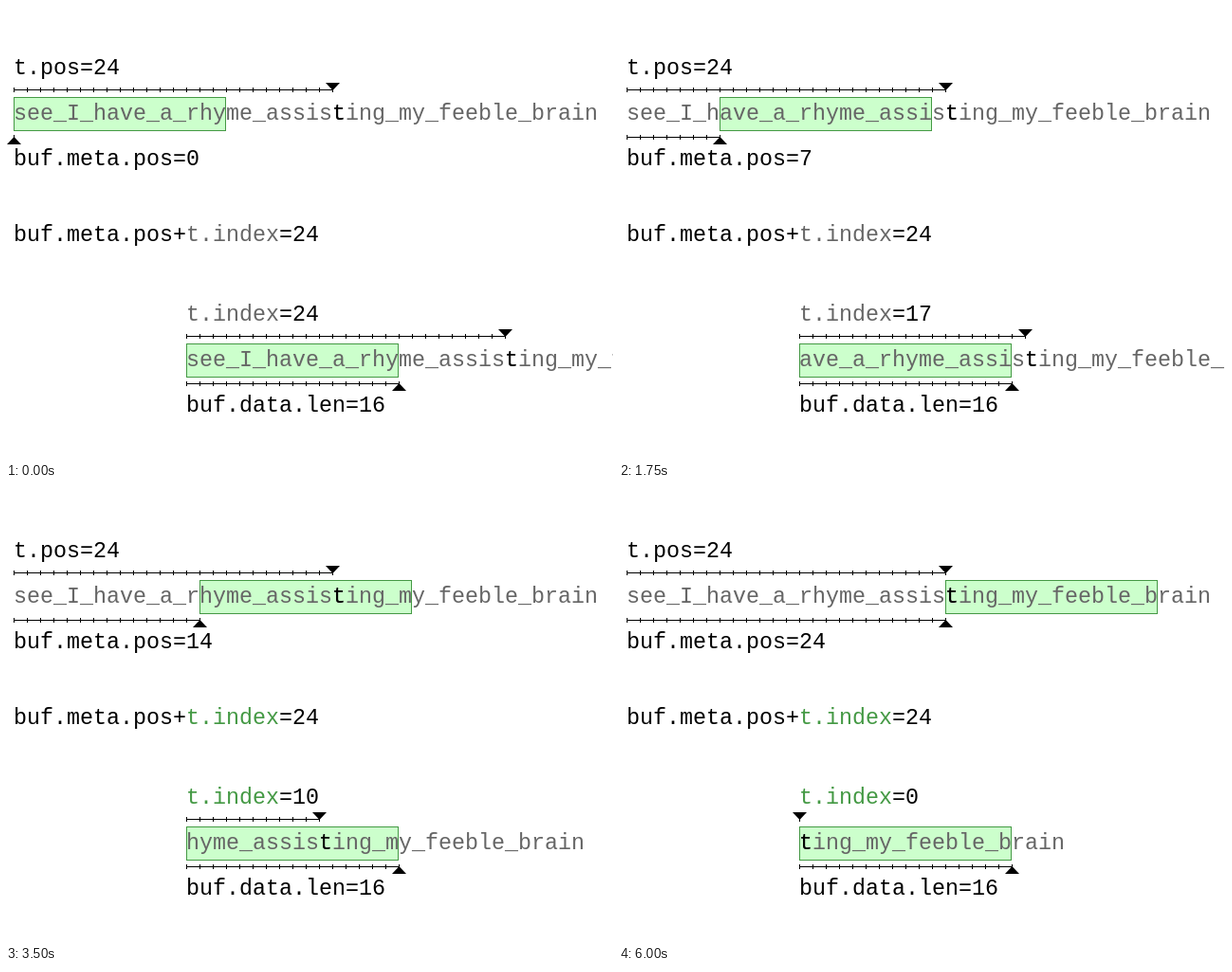
Write an HTML page that moves like this. It is 640 by 480 pixels and loops after 8000 ms.

```html
<!DOCTYPE html>
<html lang="en">
<head>
<meta charset="utf-8">
<title>Buffer position and token index</title>
<style>
  html, body { margin: 0; width: 100%; height: 100%; overflow: hidden; background: #fff; }
  svg { display: block; }
  text { font: 23.33px "Liberation Mono", monospace; fill: #000; }
  .dim { fill: #666; }
  .inside { fill: #494; }
  .window { fill: #cfc; stroke: #494; }
  .ruler { stroke: #000; fill: none; shape-rendering: crispEdges; }
</style>
</head>
<body>
<svg id="stage" width="640" height="480" viewBox="0 0 640 480"></svg>
<script>
const CELL = 14, LEFT = 8, INNER = 190;
const TEXT = 'see_I_have_a_rhyme_assisting_my_feeble_brain';
const TARGET = 24, LENGTH = 16;
const STEP = 250, LOOP = 8000;
const stage = document.getElementById('stage');

function add(tag, attrs, content = '', parent = stage) {
  const node = document.createElementNS('http://www.w3.org/2000/svg', tag);
  for (const key in attrs) node.setAttribute(key, attrs[key]);
  node.textContent = content;
  return parent.appendChild(node);
}

const label = (x, y, content, cls = '') => add('text', { x, y, class: cls }, content);

const frame = (x, y) =>
  add('rect', { x: x + .5, y: y + .5, width: LENGTH * CELL - 1, height: 35, class: 'window' });

// A ruler with an arrow at its end; dir is 1 for pointing down, -1 for up.
function ruler(x, y, dir) {
  const line = add('path', { class: 'ruler' });
  const base = dir > 0 ? y - 7 : y + 8;
  const tip = dir > 0 ? y + 1 : y;
  const arrow = add('path', { d: `M${x - 7} ${base}h15L${x + .5} ${tip}z` });
  return count => {
    let d = `M${x} ${y + .5}h${count * CELL + 1}`;
    for (let i = 0; i <= count; i++) d += `M${x + i * CELL + .5} ${y - 2}v5`;
    line.setAttribute('d', d);
    arrow.setAttribute('transform', `translate(${count * CELL})`);
  };
}

const outerFrame = frame(LEFT, 96);
frame(INNER, 356);

label(LEFT, 72, 't.pos=' + TARGET);
label(LEFT, 120, TEXT, 'dim');
label(LEFT + TARGET * CELL, 120, TEXT[TARGET]);
const metaPos = label(LEFT, 168, '');

label(LEFT, 248, 'buf.meta.pos+');
const sumIndex = label(INNER, 248, 't.index');
label(INNER + 7 * CELL, 248, '=' + TARGET);

const indexName = label(INNER, 332, 't.index');
const indexValue = label(INNER + 7 * CELL, 332, '');
const innerText = label(INNER, 380, '', 'dim');
const innerTarget = label(INNER, 380, TEXT[TARGET]);
label(INNER, 428, 'buf.data.len=' + LENGTH);

ruler(LEFT, 88, 1)(TARGET);
const metaRuler = ruler(LEFT, 138, -1);
const indexRuler = ruler(INNER, 348, 1);
ruler(INNER, 398, -1)(LENGTH);

function show(pos) {
  const index = TARGET - pos;
  const cls = index < LENGTH ? 'inside' : 'dim';
  outerFrame.setAttribute('transform', `translate(${pos * CELL})`);
  metaPos.textContent = 'buf.meta.pos=' + pos;
  indexValue.textContent = '=' + index;
  innerText.textContent = TEXT.slice(pos);
  innerTarget.setAttribute('x', INNER + index * CELL);
  sumIndex.setAttribute('class', cls);
  indexName.setAttribute('class', cls);
  metaRuler(pos);
  indexRuler(index);
}

let shown = -1;
function tick() {
  const pos = Math.min(TARGET, Math.floor(performance.now() % LOOP / STEP));
  if (pos !== shown) show(shown = pos);
  requestAnimationFrame(tick);
}
tick();
</script>
</body>
</html>
```
